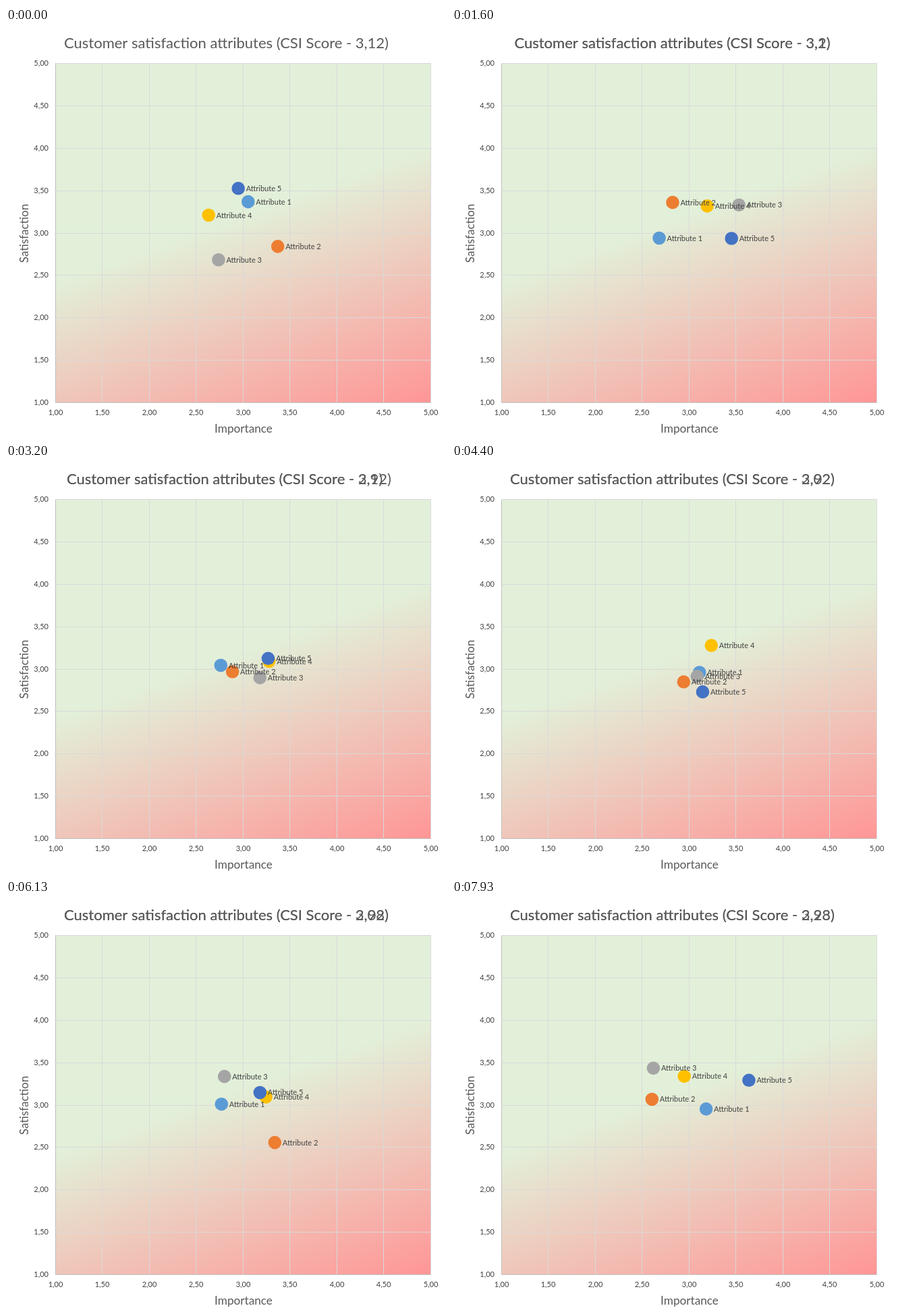
An HTML page with a canvas that plays this animation: 652 by 605 pixels, repeating every 8000 ms.

```html
<!DOCTYPE html>
<html lang="en">
<head>
<meta charset="utf-8">
<title>Customer satisfaction attributes</title>
<style>
  html, body { margin: 0; width: 652px; height: 605px; overflow: hidden; background: #fff; }
  canvas { display: block; }
</style>
</head>
<body>
<canvas id="chart" width="652" height="605"></canvas>
<script>
const ctx = document.getElementById('chart').getContext('2d');
const LOOP = 8000, FPS = 15;
const LEFT = 73, TOP = 52, WIDTH = 556, HEIGHT = 503;
const RIGHT = LEFT + WIDTH, BOTTOM = TOP + HEIGHT;
const COLORS = ['#5b9bd5', '#ed7d31', '#a5a5a5', '#ffc000', '#4472c4'];
const RESPONDENTS = 19;

// Rating sums [importance, satisfaction] of attributes 1 to 5 in each survey
const SURVEYS = [
  [[58, 64], [64, 54], [52, 51], [50, 61], [56, 67]],
  [[52, 55], [53, 66], [69, 65], [60, 65], [66, 53]],
  [[47, 59], [56, 56], [60, 57], [63, 56], [64, 66]],
  [[61, 56], [53, 57], [61, 52], [61, 63], [59, 49]],
  [[53, 57], [65, 45], [51, 66], [63, 60], [62, 61]],
  [[51, 58], [57, 63], [62, 53], [56, 54], [54, 55]],
  [[61, 56], [49, 58], [49, 66], [56, 64], [70, 63]]
];

// Moves between surveys: first tick, number of ticks, progress at first tick, gain per tick
const MOVES = [
  [5, 5, .215, .2],
  [24, 5, .215, .2],
  [48, 5, .39, .2],
  [66, 6, .24, .185],
  [92, 6, .2, .185],
  [115, 6, .203, .185]
];

const mix = (a, b, p) => a + (b - a) * p;
const plotX = v => LEFT + .5 + (v - 1) / 4 * WIDTH;
const plotY = v => BOTTOM + .5 - (v - 1) / 4 * HEIGHT;

// Importance-weighted mean satisfaction, without trailing zeros
function titleOf(survey) {
  let weight = 0, sum = 0;
  for (const [imp, sat] of survey) {
    weight += imp;
    sum += imp * sat;
  }
  const score = +(sum / weight / RESPONDENTS).toFixed(2);
  return `Customer satisfaction attributes (CSI Score - ${String(score).replace('.', ',')})`;
}

function text(str, x, y, size, color, align = 'left') {
  ctx.font = `${size}px Lato, Carlito, sans-serif`;
  ctx.fillStyle = color;
  ctx.textAlign = align;
  ctx.fillText(str, x, y);
}

function line(x1, y1, x2, y2, color) {
  ctx.strokeStyle = color;
  ctx.beginPath();
  ctx.moveTo(x1 + .5, y1 + .5);
  ctx.lineTo(x2 + .5, y2 + .5);
  ctx.stroke();
}

function drawPlot() {
  ctx.fillStyle = '#fff';
  ctx.fillRect(0, 0, 652, 605);
  const fill = ctx.createLinearGradient(LEFT, TOP, LEFT + 227, TOP + 623);
  fill.addColorStop(0, '#e2f0d9');
  fill.addColorStop(.46, '#e2f0d9');
  fill.addColorStop(1, '#ff9696');
  ctx.fillStyle = fill;
  ctx.fillRect(LEFT, TOP, WIDTH, HEIGHT);

  ctx.lineWidth = 1;
  for (let i = 0; i <= 8; i++) {
    const x = Math.floor(LEFT + WIDTH * i / 8);
    const y = Math.round(BOTTOM - HEIGHT * i / 8);
    const label = (1 + i / 2).toFixed(2).replace('.', ',');
    line(x, TOP, x, BOTTOM, '#d9d9d9');
    line(LEFT, y, RIGHT, y, '#d9d9d9');
    text(label, x + .5, 574, 11, '#404040', 'center');
    text(label, 63, y + 4, 11, '#404040', 'right');
  }
  line(LEFT, TOP, LEFT, BOTTOM, '#bfbfbf');
  line(LEFT, BOTTOM, RIGHT, BOTTOM, '#bfbfbf');

  text('Importance', 352, 600, 17.2, '#595959', 'center');
  ctx.save();
  ctx.translate(33, 304.5);
  ctx.rotate(-Math.PI / 2);
  text('Satisfaction', 0, 0, 17, '#595959', 'center');
  ctx.restore();
}

// During a move both titles share one left edge
function drawTitle(from, to, p) {
  ctx.font = '22px Lato, Carlito, sans-serif';
  const edge = str => 326.5 - ctx.measureText(str).width / 2;
  const x = mix(edge(from), edge(to), p);
  if (p < 1) text(from, x, 30, 22, '#595959');
  if (p > 0) text(to, x, 30, 22, '#595959');
}

function draw(time) {
  const tick = Math.floor(time * FPS / 1000 + .06);
  let index = 0, p = 0;
  MOVES.forEach(([start, count, first, gain], i) => {
    const step = tick - start;
    if (step < 0) return;
    index = i;
    p = step >= count - 1 ? 1 : Math.min(1, first + gain * step);
  });
  const from = SURVEYS[index], to = SURVEYS[index + 1];

  drawPlot();
  drawTitle(titleOf(from), titleOf(to), p);

  const points = from.map(([imp, sat], i) => [
    plotX(mix(imp, to[i][0], p) / RESPONDENTS),
    plotY(mix(sat, to[i][1], p) / RESPONDENTS)
  ]);
  points.forEach(([x, y], i) => {
    ctx.fillStyle = COLORS[i];
    ctx.beginPath();
    ctx.arc(x, y, 9.8, 0, 2 * Math.PI);
    ctx.fill();
  });
  points.forEach(([x, y], i) => text(`Attribute ${i + 1}`, x + 11.5, y + 4, 11, '#404040'));
}

const begin = performance.now();
function frame() {
  draw((performance.now() - begin) % LOOP);
  requestAnimationFrame(frame);
}
frame();
</script>
</body>
</html>
```
